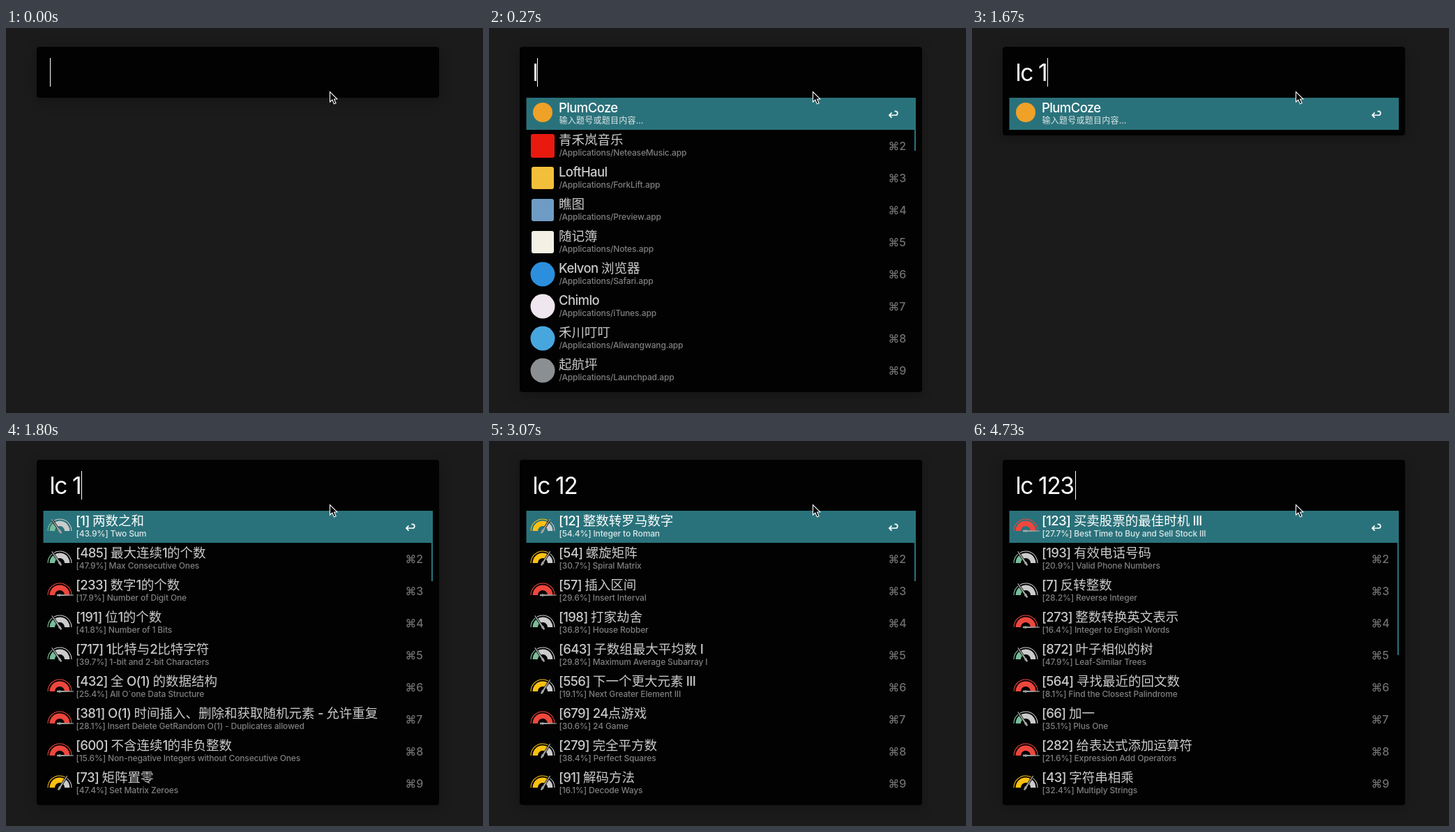
Recreate the animation shown at these times as an HTML page with a canvas. Size 684x552 px, loop 4.94 s.

```html
<!DOCTYPE html>
<html lang="zh-CN">
<head>
<meta charset="utf-8">
<title>Launcher search</title>
<style>
html, body { margin: 0; width: 100%; height: 100%; overflow: hidden; background: #1b1b1b; }
canvas { display: block; }
</style>
</head>
<body>
<canvas id="stage" width="684" height="552"></canvas>
<script>
const ctx = document.getElementById('stage').getContext('2d');
const LOOP = 4940;
const FONT = 'Inter, "Noto Sans CJK SC", "Noto Sans CJK", sans-serif';
const TEAL = '#2a727b';
const ROW = 46, TOP = 100;

const task = { title: 'PlumCoze', sub: '输入题号或题目内容...', icon: 'circle', color: '#f0a127', r: 14, dy: -2 };
const app = (title, file, icon, color, r = 17) =>
  ({ title, sub: `/Applications/${file}.app`, icon, color, r, dy: 0 });

const apps = [
  task,
  app('青禾岚音乐', 'NeteaseMusic', 'square', '#e9190f'),
  app('LoftHaul', 'ForkLift', 'square', '#f2bf3a', 16),
  app('瞧图', 'Preview', 'square', '#6f9cc4', 16),
  app('随记簿', 'Notes', 'square', '#f4f0e4', 16),
  app('Kelvon 浏览器', 'Safari', 'circle', '#2c8fdd', 17.5),
  app('Chimlo', 'iTunes', 'circle', '#f0e6ef', 17.5),
  app('禾川叮叮', 'Aliwangwang', 'circle', '#48a6df', 17.5),
  app('起航坪', 'Launchpad', 'circle', '#8b8f92', 17.5)
];

// Each line: level, number, title, acceptance, English title
const problems = text => text.trim().split('\n').map(line => {
  const [level, id, title, rate, name] = line.trim().split('|');
  return { title: `[${id}] ${title}`, sub: `[${rate}%] ${name}`, icon: 'gauge', level };
});

const one = problems(`
  easy|1|两数之和|43.9|Two Sum
  easy|485|最大连续1的个数|47.9|Max Consecutive Ones
  hard|233|数字1的个数|17.9|Number of Digit One
  easy|191|位1的个数|41.8|Number of 1 Bits
  easy|717|1比特与2比特字符|39.7|1-bit and 2-bit Characters
  hard|432|全 O(1) 的数据结构|25.4|All O\`one Data Structure
  hard|381|O(1) 时间插入、删除和获取随机元素 - 允许重复|28.1|Insert Delete GetRandom O(1) - Duplicates allowed
  hard|600|不含连续1的非负整数|15.6|Non-negative Integers without Consecutive Ones
  medium|73|矩阵置零|47.4|Set Matrix Zeroes`);

const twelve = problems(`
  medium|12|整数转罗马数字|54.4|Integer to Roman
  medium|54|螺旋矩阵|30.7|Spiral Matrix
  hard|57|插入区间|29.6|Insert Interval
  easy|198|打家劫舍|36.8|House Robber
  easy|643|子数组最大平均数 I|29.8|Maximum Average Subarray I
  medium|556|下一个更大元素 III|19.1|Next Greater Element III
  hard|679|24点游戏|30.6|24 Game
  medium|279|完全平方数|38.4|Perfect Squares
  medium|91|解码方法|16.1|Decode Ways`);

const all = problems(`
  hard|123|买卖股票的最佳时机 III|27.7|Best Time to Buy and Sell Stock III
  easy|193|有效电话号码|20.9|Valid Phone Numbers
  easy|7|反转整数|28.2|Reverse Integer
  hard|273|整数转换英文表示|16.4|Integer to English Words
  easy|872|叶子相似的树|47.9|Leaf-Similar Trees
  hard|564|寻找最近的回文数|8.1|Find the Closest Palindrome
  easy|66|加一|35.1|Plus One
  hard|282|给表达式添加运算符|21.6|Expression Add Operators
  medium|43|字符串相乘|32.4|Multiply Strings`);

const QUERY = 'lc 123';
const CARET_X = [63, 69, 86, 94, 108, 127, 148];
const keys = [200, 600, 1200, 1530, 2530, 3600];
const hidden = [[1070, 1200], [2130, 2530], [3070, 3600], [4130, 4730]];
const results = [
  { at: 0, rows: [], bar: 0 },
  { at: 270, rows: apps, bar: 176 },
  { at: 600, rows: [task], bar: 0 },
  { at: 1800, rows: one, bar: 201 },
  { at: 2730, rows: twelve, bar: 201 },
  { at: 3800, rows: all, bar: 307 }
];

// Latin and CJK runs carry their own tracking
function text(str, x, y, size, color, latin, cjk = 0, weight = 500) {
  ctx.font = `${weight} ${size}px ${FONT}`;
  ctx.fillStyle = color;
  for (const run of str.match(/[\u3000-\u9fff]+|[^\u3000-\u9fff]+/g) || []) {
    ctx.letterSpacing = (run[0] >= '\u3000' ? cjk : latin) + 'px';
    ctx.fillText(run, x, y);
    x += ctx.measureText(run).width;
  }
}

function arc(x, y, r, from, to, width, color) {
  ctx.beginPath();
  ctx.arc(x, y, r, from, to);
  ctx.lineWidth = width;
  ctx.strokeStyle = color;
  ctx.stroke();
}

const gauges = {
  easy: { color: '#78bd9a', angle: 1.31 * Math.PI },
  medium: { color: '#fbc012', angle: 1.68 * Math.PI },
  hard: { color: '#ee473d', angle: 2 * Math.PI }
};

function gauge(x, y, level) {
  const { color, angle } = gauges[level];
  const start = Math.PI, end = 2 * Math.PI;
  for (const [r, width] of [[17, 1.1], [10.7, 7.4]]) {
    arc(x, y, r, start, angle, width, color);
    if (angle < end) arc(x, y, r, angle, end, width, '#cbcbcb');
  }
  ctx.save();
  ctx.translate(x, y);
  ctx.rotate(angle);
  ctx.fillStyle = '#000';
  if (angle < end) ctx.fillRect(5, -1.6, 13, 3.2);
  ctx.fillStyle = '#a2a5a3';
  ctx.beginPath();
  ctx.moveTo(-4, -1.3);
  ctx.lineTo(20, -0.6);
  ctx.lineTo(20, 0.6);
  ctx.lineTo(-4, 1.3);
  ctx.fill();
  ctx.beginPath();
  ctx.arc(0, 0, 1.8, 0, 2 * Math.PI);
  ctx.fill();
  ctx.restore();
}

function icon(item, top) {
  const x = 77, y = top + 23;
  if (item.icon === 'gauge') return gauge(x, top + 29, item.level);
  const { r, dy } = item;
  ctx.fillStyle = item.color;
  ctx.beginPath();
  if (item.icon === 'circle') ctx.arc(x, y + dy, r, 0, 2 * Math.PI);
  else ctx.roundRect(x - r, y - r, 2 * r, 2 * r, 3);
  ctx.fill();
}

function returnKey(x, y) {
  ctx.strokeStyle = '#fff';
  ctx.lineWidth = 1.7;
  ctx.beginPath();
  ctx.moveTo(x + 4.5, y - 3.6);
  ctx.lineTo(x + 1, y);
  ctx.lineTo(x + 4.5, y + 3.6);
  ctx.moveTo(x + 1, y);
  ctx.lineTo(x + 10, y);
  ctx.arc(x + 10, y - 2.8, 2.8, Math.PI / 2, -Math.PI / 2, true);
  ctx.lineTo(x + 8.5, y - 5.6);
  ctx.stroke();
}

function row(item, i) {
  const top = TOP + i * ROW, active = i === 0;
  if (active) {
    ctx.fillStyle = TEAL;
    ctx.fillRect(53.5, top, 558.5, ROW);
  }
  icon(item, top);
  text(item.title, 100, top + 21, 18.5, active ? '#fff' : '#cacaca', -0.6);
  text(item.sub, 100.5, top + 37, 12, active ? '#dde7e8' : '#7f7f7f', -0.15, 0.25);
  if (active) returnKey(573, top + 25);
  else text('⌘' + (i + 1), 572.5, top + 29, 16, '#707070', 0);
}

function pointer(x, y) {
  ctx.beginPath();
  ctx.moveTo(x, y);
  ctx.lineTo(x, y + 14.5);
  ctx.lineTo(x + 3.3, y + 11.5);
  ctx.lineTo(x + 6, y + 17.3);
  ctx.lineTo(x + 8.6, y + 16.2);
  ctx.lineTo(x + 6, y + 10.5);
  ctx.lineTo(x + 10.3, y + 10.3);
  ctx.closePath();
  ctx.fillStyle = '#000';
  ctx.fill();
  ctx.strokeStyle = '#fff';
  ctx.lineWidth = 1.1;
  ctx.stroke();
}

function panel(height) {
  ctx.save();
  ctx.shadowColor = 'rgba(0, 0, 0, 0.25)';
  ctx.shadowBlur = 18;
  ctx.shadowOffsetY = 4;
  ctx.fillStyle = '#020202';
  ctx.beginPath();
  ctx.roundRect(44, 27, 577, height, 4);
  ctx.fill();
  ctx.restore();
}

function draw(t) {
  const { rows, bar } = results.filter(r => r.at <= t).pop();
  const typed = keys.filter(k => k <= t).length;

  ctx.fillStyle = '#1b1b1b';
  ctx.fillRect(0, 0, 684, 552);
  panel(rows.length ? 81 + rows.length * ROW : 73);
  text(QUERY.slice(0, typed), 62.5, 76, 33.5, '#fff', -1.4, 0, 400);
  if (!hidden.some(([from, to]) => t >= from && t < to)) {
    ctx.fillStyle = '#fff';
    ctx.fillRect(CARET_X[typed], 43, 1, 41);
  }
  rows.forEach(row);
  if (bar) {
    ctx.fillStyle = TEAL;
    ctx.fillRect(610, TOP, 2, bar - TOP);
  }
  pointer(464.5, 91.5);
}

const begin = performance.now();
function tick() {
  draw((performance.now() - begin) % LOOP);
  requestAnimationFrame(tick);
}
tick();
</script>
</body>
</html>
```
